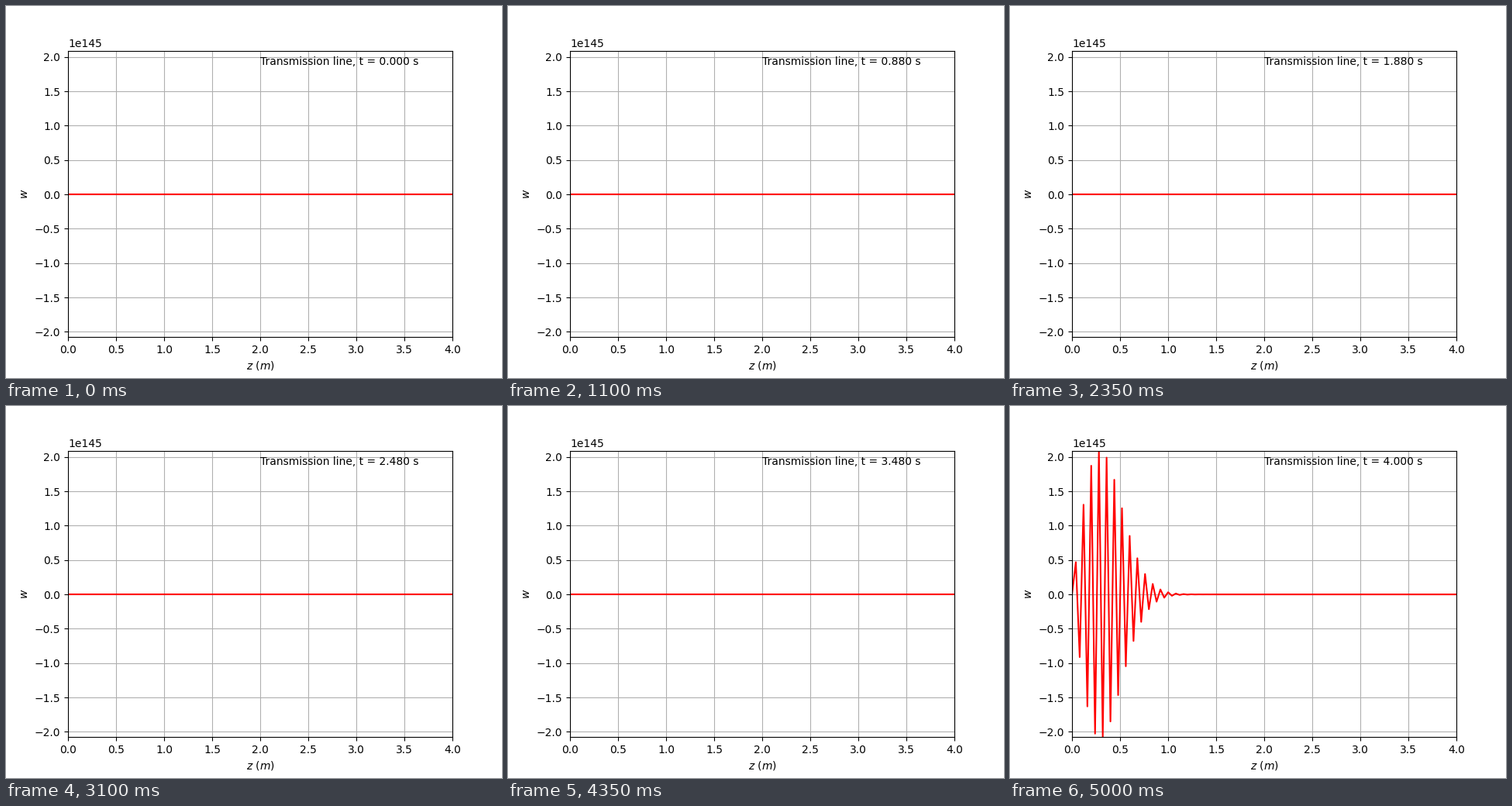
A matplotlib script that plays this animation: 640x480 px, repeating every 5050 ms.

```python
import numpy as np
import matplotlib.pyplot as plt
from matplotlib.animation import FuncAnimation

STEPS = 100          # time steps, also the number of cells
DT = DZ = 0.04
COURANT2 = 8.0       # squared Courant number, far beyond stability
PEAK = 2.0935e145


def solve():
    """Leapfrog wave equation driven by a sine at z = 0."""
    w = np.zeros((STEPS + 1, STEPS + 1))
    for n in range(1, STEPS + 1):
        cur = w[n - 1]
        old = w[n - 2] if n > 1 else cur
        curve = cur[2:] - 2 * cur[1:-1] + cur[:-2]
        w[n, 1:-1] = 2 * cur[1:-1] - old[1:-1] + COURANT2 * curve
        w[n, 0] = np.sin(n * DT)
    return w * (PEAK / w.max())


z = np.arange(STEPS + 1) * DZ
waves = solve()

fig, ax = plt.subplots(figsize=(6.4, 4.8), dpi=100)
ax.set_xlim(0, 4)
ax.set_ylim(waves.min(), waves.max())
ax.set_xlabel(r"$z\ (m)$")
ax.set_ylabel(r"$w$")
ax.grid(True)
line, = ax.plot(z, waves[0], color="red", lw=1.5)
label = ax.text(0.5, 0.95, "", transform=ax.transAxes)


def draw(n):
    line.set_ydata(waves[n])
    label.set_text(f"Transmission line, t = {n * DT:.3f} s")
    return line, label


anim = FuncAnimation(fig, draw, frames=STEPS + 1, interval=50, repeat=True)
plt.show()
```
